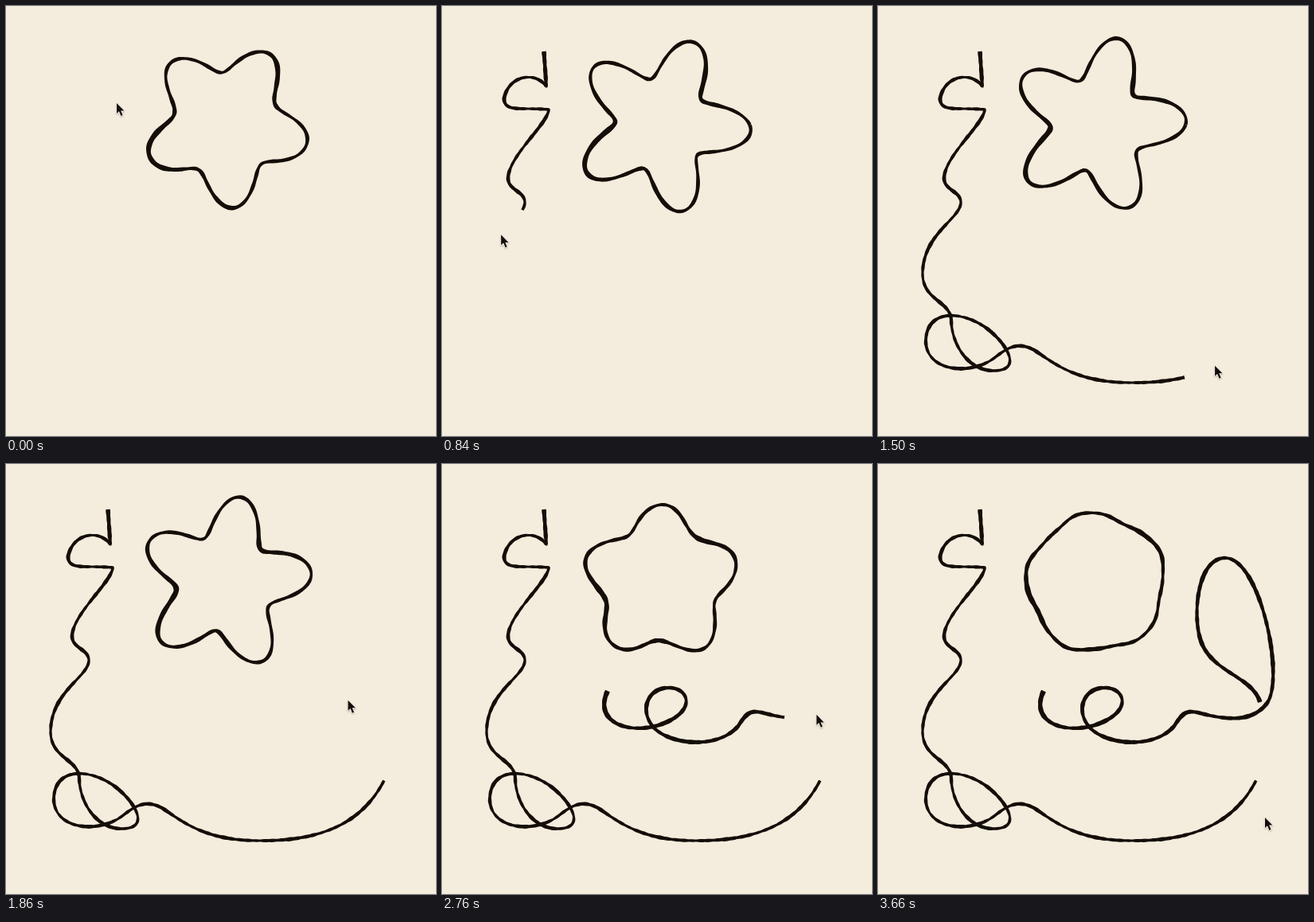
An HTML page with a canvas for the animation above (3720 ms loop, 540 by 540 pixels).

```html
<!DOCTYPE html>
<html lang="en">
<head>
<meta charset="utf-8">
<title>Ink lines and a star</title>
<style>
  html, body { margin: 0; width: 100%; height: 100%; overflow: hidden; background: #f4ecdc; }
  canvas { display: block; }
</style>
</head>
<body>
<canvas id="stage" width="540" height="540"></canvas>
<script>
const ctx = document.getElementById('stage').getContext('2d');
const LOOP = 3720, STEP = 60, LEAD = 40, INK = '#140e09';
const { sin, cos, PI, hypot, min, max, exp, floor } = Math;

// Samples an SVG path once per pixel of its length.
function trace(d) {
  const path = document.createElementNS('http://www.w3.org/2000/svg', 'path');
  path.setAttribute('d', d);
  return Array.from({ length: floor(path.getTotalLength()) + 1 }, (_, s) => {
    const { x, y } = path.getPointAtLength(s);
    return [x, y];
  });
}

const tall = {
  start: 320, duration: 1260, weight: 4,
  points: trace(`M128 57L131 101C118 82 84 86 78 116C78 134 100 127 134 130
    C133 148 84 188 83 216C83 232 104 232 104 247C103 268 56 286 56 337
    C57 371 92 370 92 396C93 425 113 458 145 458C180 458 164 429 144 411
    C114 383 60 376 60 422C62 460 117 464 146 442C163 429 175 421 196 432
    C222 449 250 474 322 473C398 473 448 450 475 397`)
};
const wide = {
  start: 2260, duration: 832, weight: 4.8,
  points: trace(`M208 285C190 323 232 340 272 328C321 312 311 281 285 281
    C256 281 247 313 268 333C290 353 347 358 372 329C384 310 389 309 405 313
    C440 322 470 324 488 301C512 271 480 118 436 118C403 118 396 181 403 213
    C412 262 470 264 480 300`)
};

// Number of points drawn so far; the hand speeds up along the way.
function progress({ points, start, duration }, t) {
  const u = max(0, min(1, (t - start) / duration));
  return floor(points.length * u ** 1.5);
}

function ribbon(points, width) {
  if (points.length < 2) return;
  const left = [], right = [];
  points.forEach(([x, y], i) => {
    const a = points[max(0, i - 2)], b = points[min(points.length - 1, i + 2)];
    const len = hypot(b[0] - a[0], b[1] - a[1]) || 1;
    const nx = (a[1] - b[1]) / len, ny = (b[0] - a[0]) / len, w = width(i) / 2;
    left.push([x + nx * w, y + ny * w]);
    right.unshift([x - nx * w, y - ny * w]);
  });
  ctx.beginPath();
  left.concat(right).forEach(p => ctx.lineTo(...p));
  ctx.fillStyle = INK;
  ctx.fill();
}

function drawLine(line, t) {
  ribbon(line.points.slice(0, progress(line, t)), s => line.weight + exp(-s / 35)
    + 0.5 * sin(s * 0.07) + 0.4 * sin(s * 0.23 + 1) + 0.3 * sin(s * 0.61));
}

function drawStar(t) {
  const swing = 14.5 + 12.5 * cos((t - 1150) / 6000 * 2 * PI);
  const turn = (13 - 0.0109 * t) * PI / 180;
  const cx = 276.5 - t * 0.0007, cy = 149.3, steps = 420;
  const bump = (a, centre, spread) => exp((cos(a - centre) - 1) / spread);
  const points = [], widths = [];
  for (let i = 0; i <= steps; i++) {
    const a = i / steps * 2 * PI;
    const r = 85.3 + swing * cos(5 * (a - turn)) + 0.4 * sin(13 * a + 1);
    points.push([cx + r * cos(a), cy + r * sin(a)]);
    widths.push(4.2 + 2.2 * bump(a, 2.9, 0.12) + 1.6 * bump(a, -0.75, 0.06)
      + bump(a, 1.65, 0.04) + 0.5 * sin(13 * a) + 0.4 * sin(37 * a + 2));
  }
  ribbon(points, i => widths[i]);
}

// Gathers speed between two points, optionally along an upward arc.
function glide(from, to, u, lift) {
  const k = u * u;
  return [from[0] + (to[0] - from[0]) * k,
          from[1] + (to[1] - from[1]) * k - lift * sin(PI * u)];
}

function cursorAt(t) {
  const end = line => line.start + line.duration;
  const last = line => line.points[line.points.length - 1];
  const along = line => line.points[min(line.points.length - 1, progress(line, t) + LEAD)];
  const between = (a, b) => (t - a) / (b - a);
  if (t < tall.start) return glide([139, 122], tall.points[0], t / tall.start, 85);
  if (t < end(tall)) return along(tall);
  if (t < wide.start)
    return glide(last(tall), wide.points[0], between(end(tall), wide.start), 85);
  if (t < end(wide)) return along(wide);
  return glide(last(wide), [486, 444], between(end(wide), LOOP - STEP), 0);
}

const arrow = new Path2D('M0 0V13L3 10.3L5.4 16L7.6 15L5.2 9.6H9.4Z');

function drawCursor(t) {
  ctx.save();
  ctx.translate(...cursorAt(t));
  ctx.lineJoin = 'round';
  ctx.shadowColor = 'rgba(0,0,0,.25)';
  ctx.shadowBlur = 2;
  ctx.shadowOffsetY = 1;
  ctx.strokeStyle = '#faf6ec';
  ctx.lineWidth = 1.6;
  ctx.stroke(arrow);
  ctx.shadowColor = 'transparent';
  ctx.fillStyle = INK;
  ctx.fill(arrow);
  ctx.restore();
}

function frame() {
  const t = floor(performance.now() % LOOP / STEP) * STEP;
  ctx.fillStyle = '#f4ecdc';
  ctx.fillRect(0, 0, 540, 540);
  drawStar(t);
  drawLine(tall, t);
  drawLine(wide, t);
  drawCursor(t);
  requestAnimationFrame(frame);
}
frame();
</script>
</body>
</html>
```
